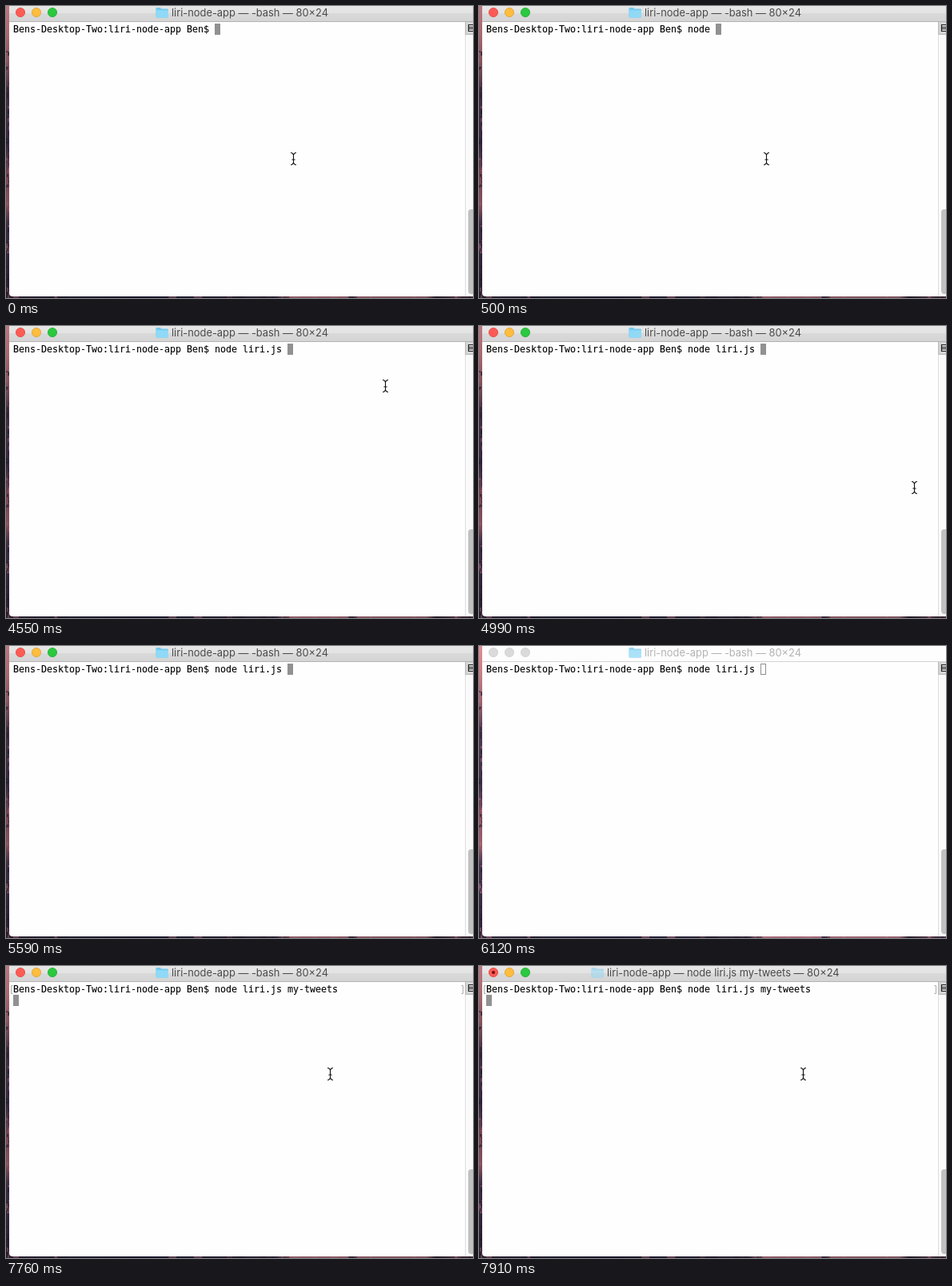
An HTML page that plays this animation: 584x365 px, repeating every 8 s.

```html
<!DOCTYPE html>
<html lang="en">
<head>
<meta charset="utf-8">
<title>Terminal</title>
<style>
  html, body { margin: 0; width: 100%; height: 100%; overflow: hidden; background: #2a2030; }
  svg { display: block; }
  text { white-space: pre; }
  .mono { font: 11.63px "DejaVu Sans Mono", monospace; fill: #000; stroke: #000; stroke-width: .1px; }
  .title { font: 12.87px Inter, sans-serif; fill: #4a4a4a; }
  .idle .title { fill: #b3b3b3; }
  .bar { fill: url(#barFill); }
  .idle .bar { fill: #fdfdfd; }
  .barLine { fill: #b4b4b4; }
  .idle .barLine { fill: #d3d3d3; }
  .idle .light { fill: #dadada; stroke: #d0d0d0; }
  .idle #folder { opacity: .75; }
  .shade { fill: #000; opacity: .16; }
  .idle .shade { opacity: 0; }
  #block { fill: #919191; }
  .idle #block { fill: #fff; stroke: #8e8e8e; }
</style>
</head>
<body>
<svg id="stage" width="584" height="365" viewBox="0 0 584 365">
  <defs>
    <linearGradient id="barFill" x2="0" y2="1">
      <stop offset="0" stop-color="#e6e6e6"/><stop offset=".46" stop-color="#e3e3e3"/>
      <stop offset=".5" stop-color="#d9d9d9"/><stop offset="1" stop-color="#d4d4d4"/>
    </linearGradient>
    <linearGradient id="sideFill" x2="0" y2="1">
      <stop offset="0" stop-color="#e08d97"/><stop offset=".1" stop-color="#c87c84"/>
      <stop offset=".2" stop-color="#995f6e"/><stop offset=".3" stop-color="#4d3850"/>
      <stop offset=".48" stop-color="#40304a"/><stop offset=".58" stop-color="#8d5165"/>
      <stop offset=".68" stop-color="#a0606f"/><stop offset=".75" stop-color="#453450"/>
      <stop offset="1" stop-color="#2c2338"/>
    </linearGradient>
    <linearGradient id="footFill">
      <stop offset="0" stop-color="#30263a"/><stop offset=".3" stop-color="#1c1b35"/>
      <stop offset=".58" stop-color="#352a3d"/><stop offset=".6" stop-color="#a5697a"/>
      <stop offset=".9" stop-color="#94606f"/><stop offset=".92" stop-color="#29202f"/>
      <stop offset="1" stop-color="#71485a"/>
    </linearGradient>
  </defs>

  <rect width="8" height="365" fill="url(#sideFill)"/>
  <rect y="360" width="584" height="5" fill="url(#footFill)"/>
  <g id="specks"></g>
  <path class="shade" d="M0 0H8V358H584V365H0Z"/>

  <path d="M4 0H584V363H8.5Q4 363 4 358.5Z" fill="#fefefe"/>
  <rect class="bar" x="4" width="580" height="19"/>
  <rect class="barLine" x="4" y="19" width="580" height="1"/>
  <g id="lights"></g>
  <path id="close" d="M16 8a2 2 0 1 0 4 0a2 2 0 1 0-4 0" fill="#750b0b"/>
  <g id="folder">
    <path d="M0 3.2Q0 2 1.2 2H5.4L7 3.5H14.2Q15.5 3.5 15.5 4.8V13Q15.5 14.5 14 14.5H1.5Q0 14.5 0 13Z" fill="#74c9ee"/>
    <path d="M0 5.2H15.5V13Q15.5 14.5 14 14.5H1.5Q0 14.5 0 13Z" fill="#8fd9f7"/>
  </g>
  <text class="title" id="title" y="13"></text>

  <rect x="574" y="20" width="10" height="343" fill="#fafafa"/>
  <rect x="574" y="20" width="1" height="343" fill="#dedede"/>
  <rect x="578" y="254" width="12" height="106" rx="4" fill="#c1c1c1"/>
  <rect x="574" y="20" width="10" height="15" fill="#d5d5d5"/>
  <path d="M574.5 20V35.5H584" fill="none" stroke="#b9b9b9"/>
  <path d="M584 23.5H578.5V31.5H584M578 26.5H584M578 28.5H584" fill="none" stroke="#222" stroke-width="1.2"/>

  <path id="marks" d="M8.5 24.5H6.5V34.5H8.5M569.5 24.5H571.5V34.5H569.5" fill="none" stroke="#ababab"/>
  <rect id="block" width="7" height="14"/>
  <text class="mono" id="line" x="9" y="33"></text>

  <path id="beam" d="M-3-7.5Q-.6-7.3 0-4.5Q.6-7.3 3-7.5M0-4.5V4.5M-3 7.5Q-.6 7.3 0 4.5Q.6 7.3 3 7.5M-1.7 1H1.7" fill="none" stroke="#111" stroke-width="1.1" stroke-linecap="round"/>
  <path id="arrow" d="M.5.5V14.5L3.8 11.5L6 16.5L8.3 15.5L6.2 10.7H10.8Z" fill="#000" stroke="#fff"/>
</svg>
<script>
const LOOP = 8000, COL = 7, LEFT = 9;
const PROMPT = 'Bens-Desktop-Two:liri-node-app Ben$ ';
const BASH = { text: 'liri-node-app — -bash — 80×24', x: 207 };
const NODE = { text: 'liri-node-app — node liri.js my-tweets — 80×24', x: 160 };
const $ = id => document.getElementById(id);

function add(parent, tag, attrs) {
  const el = document.createElementNS('http://www.w3.org/2000/svg', tag);
  for (const k in attrs) el.setAttribute(k, attrs[k]);
  parent.append(el);
}

[['#fc5b55', '#e2463f'], ['#fdbd3e', '#e0a032'], ['#2bc840', '#1dad2e']].forEach(([fill, stroke], i) =>
  add($('lights'), 'circle', { class: 'light', cx: 18 + i * 20, cy: 8, r: 5.6, fill, stroke, 'stroke-width': .8 }));

// Mottled desktop picture along the left and lower window edges.
let seed = 11;
const rnd = () => (seed = seed * 16807 % 2147483647) / 2147483647;
for (let i = 0; i < 90; i++) {
  const side = i < 60;
  add($('specks'), 'rect', {
    x: side ? rnd() * 4 | 0 : rnd() * 584 | 0,
    y: side ? 50 + rnd() * 315 | 0 : 363,
    width: side ? 2 : 3 + rnd() * 8,
    height: side ? 2 + rnd() * 4 | 0 : 2,
    fill: rnd() < .4 ? '#b56f80' : '#221b2c', opacity: .5
  });
}

// Each step changes only the listed parts of the state.
const STEPS = [
  [0, { typed: '', beam: [359.5, 191], arrow: null, idle: false, title: BASH, sent: false }],
  [500, { typed: 'node ' }],
  [1100, { typed: 'node liri.js ' }],
  [4550, { beam: [474.5, 75] }],
  [4700, { beam: null, arrow: [507.5, 0] }],
  [4850, { beam: [522.5, 101], arrow: null }],
  [4990, { beam: [544.5, 202] }],
  [5140, { beam: [544.5, 248] }],
  [5290, { beam: [524.5, 328] }],
  [5440, { beam: [509.5, 346] }],
  [5590, { beam: null }],
  [6120, { idle: true }],
  [6260, { idle: false, typed: 'node liri.js my-tweets', beam: [405.5, 135] }],
  [7760, { sent: true }],
  [7910, { title: NODE }]
];

function show(el, on) { el.style.display = on ? '' : 'none'; }

function place(el, pos) {
  show(el, pos);
  if (pos) el.setAttribute('transform', `translate(${pos})`);
}

function draw(t) {
  const s = {};
  for (const [at, change] of STEPS) if (at <= t) Object.assign(s, change);
  const line = PROMPT + s.typed;
  const inset = s.idle ? .5 : 0;
  $('stage').classList.toggle('idle', s.idle);
  $('line').textContent = line;
  $('title').textContent = s.title.text;
  $('title').setAttribute('x', s.title.x);
  place($('folder'), [s.title.x - 19.5, 0]);
  $('folder').style.opacity = s.title === NODE ? .5 : '';
  show($('close'), s.title === NODE);
  show($('marks'), s.sent);
  $('block').setAttribute('width', COL - inset * 2);
  $('block').setAttribute('height', 14 - inset * 2);
  place($('block'), s.sent ? [LEFT, 36] : [LEFT + line.length * COL + inset, 22 + inset]);
  place($('beam'), s.beam);
  place($('arrow'), s.arrow);
}

const start = performance.now();
function tick(now) {
  draw(Math.max(0, now - start) % LOOP);
  requestAnimationFrame(tick);
}
draw(0);
requestAnimationFrame(tick);
</script>
</body>
</html>
```
